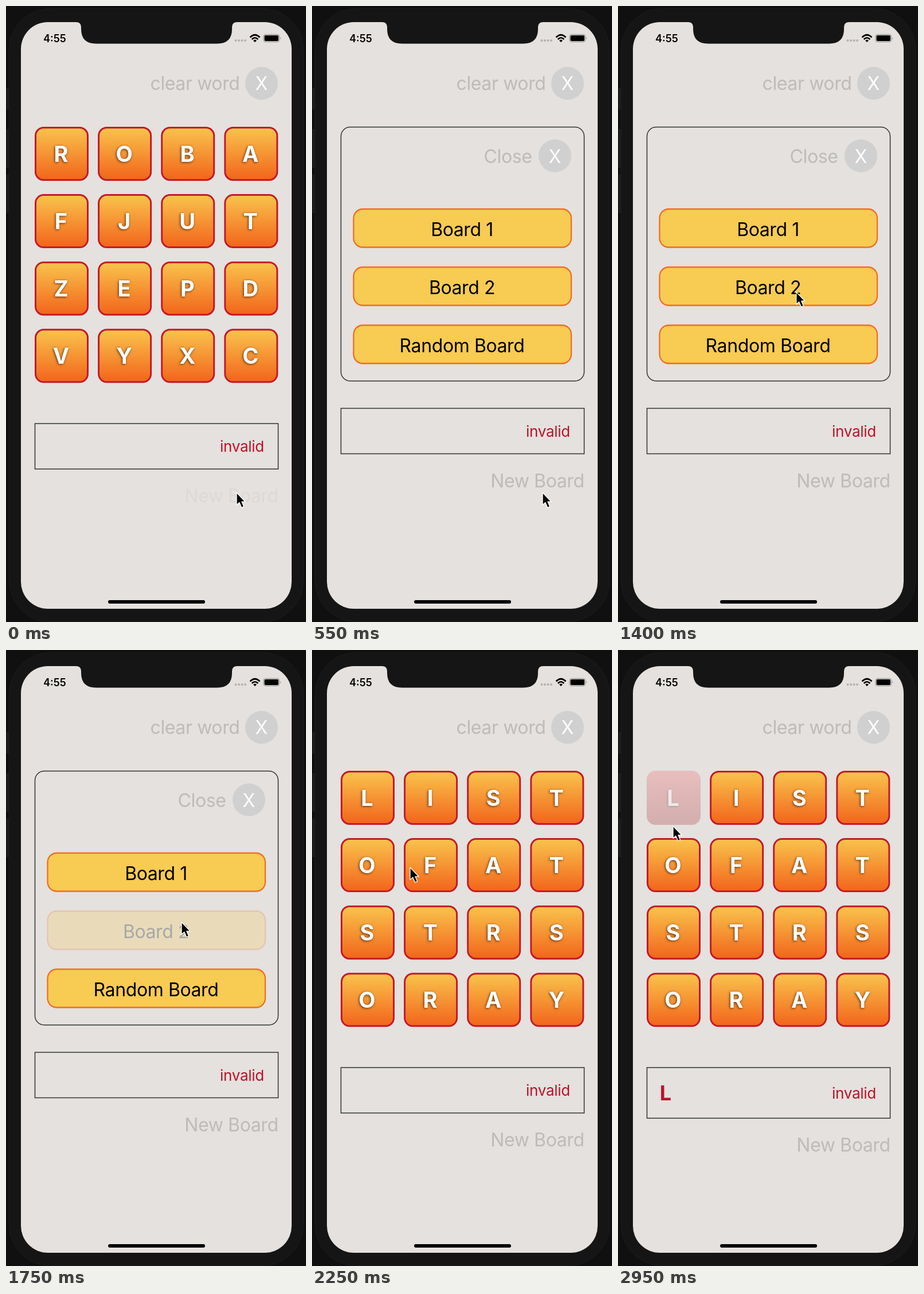
Animation of 523 by 1071 pixels, one loop 3000 ms. Source, as an HTML page:

```html
<!DOCTYPE html>
<html lang="en">
<head>
<meta charset="utf-8">
<title>Word board</title>
<style>
  html, body { margin: 0; width: 100%; height: 100%; overflow: hidden; background: #101010; }
  svg { display: block; width: 100vw; height: 100vh; }
  text { font-family: Inter, Roboto, sans-serif; text-anchor: middle; }
  .label { font-size: 32px; letter-spacing: -0.4px; }
  .soft { fill: #bdbcbb; }
  .cross { font-size: 32px; fill: #fff; }
  .letter { font-size: 38px; font-weight: 700; fill: #fff; filter: drop-shadow(-0.5px 1px 2px rgba(0, 0, 0, .65)); }
  .alert { fill: #bd1229; }
  .line { fill: none; stroke: #303432; stroke-width: 1.5; }
</style>
</head>
<body>
<svg id="stage" viewBox="0 0 523 1071" preserveAspectRatio="none">
  <defs>
    <linearGradient id="amber" x1="0" y1="0" x2="0" y2="1">
      <stop offset="0" stop-color="#f9c44c"/>
      <stop offset="1" stop-color="#f2641b"/>
    </linearGradient>
    <linearGradient id="used" x1="0" y1="0" x2="0" y2="1">
      <stop offset="0" stop-color="#f07d83"/>
      <stop offset="1" stop-color="#b65258"/>
    </linearGradient>
  </defs>

  <!-- phone -->
  <rect width="523" height="1071" fill="#101010"/>
  <g fill="#1c1c1c">
    <rect x="0" y="142" width="6" height="38"/>
    <rect x="0" y="214" width="6" height="67"/>
    <rect x="0" y="293" width="6" height="67"/>
  </g>
  <rect x="5.5" y="4.5" width="513" height="1066" rx="72" fill="#151515" stroke="#1d1d1d"/>
  <rect x="26" y="28" width="472" height="1020" rx="47" fill="#e4e1de"/>
  <path d="M122 27 V28 Q131 28 131 37 V40 Q131 65.500 157 65.500 H368 Q394 65.500 394 40 V37 Q394 28 403 28 V27 Z" fill="#151515"/>
  <rect x="178" y="1033" width="169" height="6" rx="3"/>

  <!-- status bar -->
  <text x="85" y="63" font-size="18" font-weight="600">4:55</text>
  <g fill="#b3b1af">
    <circle cx="400.500" cy="60" r="2"/><circle cx="406" cy="60" r="2"/>
    <circle cx="411.500" cy="60" r="2"/><circle cx="417" cy="60" r="2"/>
  </g>
  <g fill="none" stroke="#000" stroke-width="2.600">
    <path d="M425.500 54.500 Q434 46 442.500 54.500"/>
    <path d="M428.700 58 Q434 52.600 439.300 58"/>
  </g>
  <path d="M431 60 Q434 57 437 60 L434 63 Z"/>
  <rect x="449" y="49.500" width="27.500" height="13" rx="3.500" fill="none" stroke="#8b8987"/>
  <rect x="450.500" y="51" width="24.500" height="10" rx="2"/>
  <path d="M478 54 Q480 56 478 58 Z" fill="#8b8987"/>

  <!-- header -->
  <text class="label soft" x="329.500" y="146">clear word</text>
  <circle cx="445.500" cy="134.500" r="28.500" fill="#d0d0d0"/>
  <text class="cross" x="445.500" y="146">X</text>

  <g id="tiles"></g>

  <g id="menu">
    <rect class="line" x="50.500" y="210.500" width="424" height="441.500" rx="16"/>
    <text class="label soft" x="341.500" y="272.500">Close</text>
    <circle cx="423.500" cy="260.500" r="28.500" fill="#d0d0d0"/>
    <text class="cross" x="423.500" y="272.500">X</text>
  </g>

  <!-- word box -->
  <g id="entry">
    <rect id="box" class="line" x="50.500" y="0.500" width="424" height="79"/>
    <text id="word" class="alert" x="83" y="57.500" font-size="36" font-weight="700">L</text>
    <text id="state" class="alert" x="411.500" font-size="26" letter-spacing="-0.300">invalid</text>
    <text id="fresh" class="label soft" x="393">New Board</text>
  </g>

  <path id="cursor" d="M0 0 V21.500 L4.800 17.200 L8.600 26 L12.600 24.300 L8.900 15.800 H15 Z" stroke="#fff" stroke-width="1.300" stroke-linejoin="round"/>
</svg>

<script>
const LOOP = 3000, STEP = 50;
const OPEN = 150, PICK = 1900, TAP = 2800;
const BOARDS = ["ROBAFJUTZEPDVYXC", "LISTOFATSTRSORAY"];
const PATH = [
  [0, 402, 846], [600, 402, 846], [1000, 330, 594], [1500, 306, 473],
  [1900, 306, 473], [2250, 171, 378], [2650, 88, 269], [2800, 88, 269],
  [2950, 96, 306], [3000, 98, 314]
];

const byId = id => document.getElementById(id);

function add(parent, tag, attrs, text = "") {
  const node = document.createElementNS("http://www.w3.org/2000/svg", tag);
  for (const key in attrs) node.setAttribute(key, attrs[key]);
  node.textContent = text;
  return parent.appendChild(node);
}

const tiles = [...BOARDS[0]].map((_, i) => {
  const x = 50 + (i % 4) * 110.1, y = 210 + Math.floor(i / 4) * 117.1;
  const g = add(byId("tiles"), "g", {});
  const face = add(g, "rect", {
    x: x + 1.5, y: y + 1.5, width: 91, height: 91, rx: 14,
    fill: "url(#amber)", stroke: "#c31a2b", "stroke-width": 3
  });
  const letter = add(g, "text", { class: "letter", x: x + 46, y: y + 61 });
  return { g, face, letter };
});

const choices = ["Board 1", "Board 2", "Random Board"].map((name, i) => {
  const y = 352 + i * 101;
  const g = add(byId("menu"), "g", {});
  add(g, "rect", {
    x: 72.5, y: y + 1, width: 379.5, height: 66.5, rx: 16,
    fill: "#f8cb52", stroke: "#f06e27", "stroke-width": 2.3
  });
  add(g, "text", { class: "label", x: 261.5, y: y + 47.5 }, name);
  return g;
});

const clamp = v => Math.min(1, Math.max(0, v));
const mix = (a, b, k) => a + (b - a) * k;
const ramp = (t, from, to) => clamp((t - from) / (to - from));
const show = (node, on) => node.setAttribute("display", on ? "inline" : "none");

function pointer(t) {
  const i = PATH.findIndex(p => p[0] > t);
  const a = PATH[i - 1], b = PATH[i], k = ramp(t, a[0], b[0]);
  return [mix(a[1], b[1], k), mix(a[2], b[2], k)];
}

function draw(t) {
  const menuOpen = t >= OPEN && t < PICK;
  const tapped = t >= TAP;
  const letters = BOARDS[t < PICK ? 0 : 1];

  show(byId("menu"), menuOpen);
  show(byId("tiles"), !menuOpen);
  tiles.forEach(({ letter }, i) => letter.textContent = letters[i]);

  const first = tiles[0];
  first.face.setAttribute("fill", tapped ? "url(#used)" : "url(#amber)");
  first.face.setAttribute("stroke", tapped ? "url(#used)" : "#c31a2b");
  first.g.setAttribute("opacity", tapped ? 0.35 : mix(1, 0.25, ramp(t, 2700, TAP)));
  choices[1].setAttribute("opacity", mix(1, 0.25, ramp(t, 1650, 1750)));

  const height = tapped ? 88 : 79;
  byId("entry").setAttribute("transform", `translate(0 ${menuOpen ? 699 : 725.5})`);
  byId("box").setAttribute("height", height);
  byId("state").setAttribute("y", height / 2 + 10);
  byId("fresh").setAttribute("y", height + 58.5);
  byId("fresh").setAttribute("opacity", mix(0.2, 1, ramp(t, 100, 350)));
  show(byId("word"), tapped);

  byId("cursor").setAttribute("transform", `translate(${pointer(t)})`);
}

const start = performance.now();
function tick() {
  const t = (performance.now() - start) % LOOP;
  draw(Math.floor(t / STEP) * STEP);
  requestAnimationFrame(tick);
}
tick();
</script>
</body>
</html>
```
